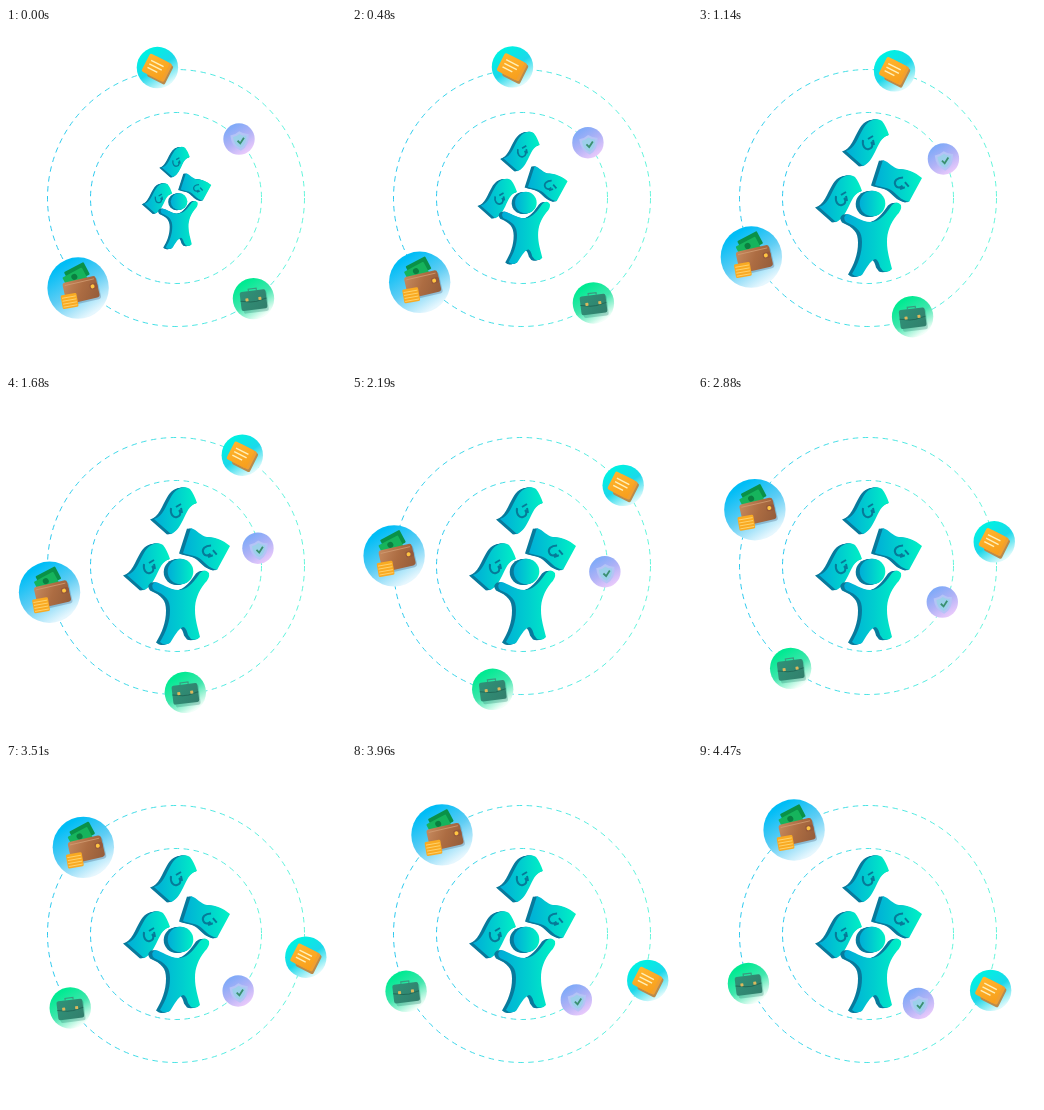
Animation of 340 by 340 pixels, one loop 4500 ms. Source, as an HTML page with a canvas:

```html
<!DOCTYPE html>
<html lang="en">
<head>
<meta charset="utf-8">
<title>Orbiting finance icons</title>
<style>
  html, body { margin: 0; width: 100%; height: 100%; overflow: hidden; background: #fff; }
  canvas { display: block; width: 340px; height: 340px; }
</style>
</head>
<body>
<canvas id="stage"></canvas>
<script>
const LOOP = 4500, STEP = 30, SIZE = 340, CENTER = 170, RAD = Math.PI / 180;
const canvas = document.getElementById('stage');
const ctx = canvas.getContext('2d');
const dpr = window.devicePixelRatio || 1;
canvas.width = canvas.height = SIZE * dpr;

const clamp = x => Math.min(1, Math.max(0, x));
const lerp = (a, b, p) => a + (b - a) * p;
const ease = x => { x = clamp(x); return x * x * (3 - 2 * x); };

function gradient(x0, y0, x1, y1, ...colors) {
  const g = ctx.createLinearGradient(x0, y0, x1, y1);
  colors.forEach((c, i) => g.addColorStop(i / (colors.length - 1), c));
  return g;
}

// Runs a drawing in a moved, turned and scaled coordinate system.
function place(x, y, degrees, scale, draw) {
  ctx.save();
  ctx.translate(x, y);
  ctx.rotate(degrees * RAD);
  ctx.scale(scale, scale);
  draw();
  ctx.restore();
}

function box(x, y, w, h, r, fill) {
  ctx.beginPath();
  ctx.roundRect(x, y, w, h, r);
  ctx.fillStyle = fill;
  ctx.fill();
}

function line(points, color, width) {
  ctx.beginPath();
  points.forEach(([x, y]) => ctx.lineTo(x, y));
  ctx.strokeStyle = color;
  ctx.lineWidth = width;
  ctx.stroke();
}

function disc(r, ...colors) {
  ctx.beginPath();
  ctx.arc(0, 0, r, 0, 7);
  ctx.fillStyle = gradient(-r * .5, -r * .75, r * .5, r * .8, ...colors);
  ctx.fill();
}

function ring(r) {
  ctx.save();
  ctx.setLineDash([5.5, 4.5]);
  ctx.beginPath();
  ctx.arc(CENTER, CENTER, r, 0, Math.PI * 2);
  ctx.strokeStyle = gradient(CENTER - r, 0, CENTER + r, 0, '#2cc8ee', '#4ae4e4', '#62f5da');
  ctx.lineWidth = 1;
  ctx.stroke();
  ctx.restore();
}

// Central figure, in stage coordinates at full size
const bill = new Path2D('M148 123C157 121 160 109 165 101C170 92 178 89 184 93Q188 98 191 107C183 109 181 116 177 124C173 132 170 136 165 138Z');
const sideBill = new Path2D('M185 132C191 134 195 140 201 141C209 141 217 144 224 150L211 174C202 172 199 166 193 162C188 159 182 159 177 157Z');
const head = new Path2D();
head.arc(174.5, 175.5, 12.8, 0, 7);
const body = new Path2D('M149 186C156 187 165 195 174 194C183 193 189 184 194 177Q199 172 203 177Q204 182 199 187C192 196 189 204 189 214C189 224 192 232 194 241Q191 245 185 243L182 239C181 234 179 231 177 231C172 233 168 241 164 247Q158 250 154 246C160 236 164 226 164 214C164 204 160 199 148 194Q144 189 149 186Z');

function extrude(path, x0, x1) {
  ctx.fillStyle = '#087a9c';
  for (let d = 4; d > 0; d--) {
    ctx.save();
    ctx.translate(-d, d * .15);
    ctx.fill(path);
    ctx.restore();
  }
  ctx.fillStyle = gradient(x0, 0, x1, 0, '#00acd8', '#00cdcf', '#00f2c4');
  ctx.fill(path);
}

const glyphShape = new Path2D('M-5 -4C-6 2 -3 6 1 5C5 4 5 0 3 -2M0 -5L5 -8M5 -4L6 1');
function glyph(x, y, degrees) {
  place(x, y, degrees, 1, () => {
    ctx.strokeStyle = '#067a98';
    ctx.lineWidth = 2;
    ctx.stroke(glyphShape);
  });
}

function figure(scale) {
  place(170.5, 170, 0, scale, () => {
    ctx.translate(-170.5, -170);
    extrude(bill, 147, 192);
    glyph(170, 116, 0);
    ctx.save();
    ctx.translate(-27, 56);
    extrude(bill, 147, 192);
    glyph(170, 116, 0);
    ctx.restore();
    extrude(sideBill, 175, 224);
    glyph(202, 155, 80);
    extrude(body, 147, 204);
    extrude(head, 161, 188);
  });
}

function wallet() {
  disc(30.7, '#00bdf6', '#5fcdf4', '#e6f7fe');
  place(-2, -12, -28, 1, () => {
    box(-9, -9, 22, 14, 1, '#0a9148');
    box(-13, -5, 22, 14, 1, '#16b45c');
    ctx.beginPath();
    ctx.arc(-2, 0, 3, 0, 7);
    ctx.fillStyle = '#0a8040';
    ctx.fill();
  });
  place(3, 2, -13, 1, () => {
    box(-16, -9, 34, 22, 3, 'rgba(70,90,120,.3)');
    box(-17, -11, 34, 22, 3, gradient(-17, -10, 17, 11, '#c68a5e', '#ac6c42', '#945c3a'));
    line([[-15, -8], [15, -8]], '#d09a70', .8);
    box(9, -4, 8, 6, 2, '#96583a');
    box(10, -3, 4, 4, 2, '#ffc542');
  });
  place(-8.5, 13, -10, 1, () => {
    box(-8, -7, 16, 14, 1.5, '#f9aa22');
    for (let y = -4; y < 6; y += 3) line([[-7, y], [7, y]], '#ffd470', .9);
  });
}

function papers() {
  disc(20.7, '#00f0e2', '#1cd8ea', '#dcfafc');
  place(-1, 0, 27, 1, () => {
    box(-5, -9, 20, 21, 2, '#b98a4c');
    box(-7, -10, 20, 20, 2, '#f0a030');
    box(-12, -10, 22, 20, 2, gradient(-10, -10, 10, 10, '#ffb52c', '#f79e1c'));
    for (let y = -4; y < 5; y += 4) line([[-8, y], [y > 3 ? 3 : 6, y]], '#fff0b8', 1.4);
  });
}

function briefcase() {
  disc(20.7, '#00ea92', '#3fe6ac', '#f2fff9');
  place(0, 1, -7, 1, () => {
    box(-11, -7, 25, 20, 2, 'rgba(40,130,110,.3)');
    line([[-4, -9], [-4, -11], [4, -11], [4, -9]], '#3a9a80', 1.2);
    box(-13, -9, 26, 19, 2, gradient(-12, -9, 12, 10, '#2f9278', '#327f6c'));
    line([[-13, 0], [-3, 2], [3, 2], [13, 0]], '#226a58', 1);
    box(-8, -2, 3, 3, .5, '#dcb85c');
    box(5, -2, 3, 3, .5, '#dcb85c');
  });
}

const shieldShape = new Path2D('M0 -8Q4 -5 8 -5Q8 5 0 9Q-8 5 -8 -5Q-4 -5 0 -8Z');
function shield() {
  disc(15.7, '#82aaf8', '#b0b2f6', '#e6c8fb');
  place(1, 1.5, -5, 1.15, () => {
    ctx.fillStyle = '#b4c4f6';
    ctx.fill(shieldShape);
    ctx.scale(.72, .72);
    ctx.fillStyle = '#9cd0ea';
    ctx.fill(shieldShape);
    line([[-3, 0], [0, 3.5], [5, -3]], '#3a9070', 2.2);
  });
}

// radii: distance from the centre at even steps along the way
const orbiters = [
  { draw: papers, from: -98.1, to: 24.7, radii: [131.8, 129, 129.4, 128.4, 135] },
  { draw: shield, from: -43.1, to: 54, radii: [86.3, 84.2, 83, 82.5, 85.9] },
  { draw: briefcase, from: 52.4, to: 157.5, radii: [127, 126.7, 126.7, 128.6, 129.4] },
  { draw: wallet, from: 137.4, to: 234.6, radii: [133, 129.5, 128.2, 126, 127.6] }
];

function radiusAt(radii, p) {
  const i = Math.min(radii.length - 2, Math.floor(p * (radii.length - 1)));
  return lerp(radii[i], radii[i + 1], p * (radii.length - 1) - i);
}

function render(t) {
  ctx.setTransform(dpr, 0, 0, dpr, 0, 0);
  ctx.fillStyle = '#fff';
  ctx.fillRect(0, 0, SIZE, SIZE);
  ring(128.5);
  ring(85.5);
  figure(lerp(.65, 1, ease(t / 900)));
  const p = ease(t / (LOOP - STEP));
  for (const { draw, from, to, radii } of orbiters) {
    const angle = lerp(from, to, p) * RAD, r = radiusAt(radii, p);
    place(CENTER + r * Math.cos(angle), CENTER + r * Math.sin(angle), 0, 1, draw);
  }
}

const start = performance.now();
function tick() {
  const t = (performance.now() - start) % LOOP;
  render(Math.floor(t / STEP) * STEP);
  requestAnimationFrame(tick);
}
tick();
</script>
</body>
</html>
```
